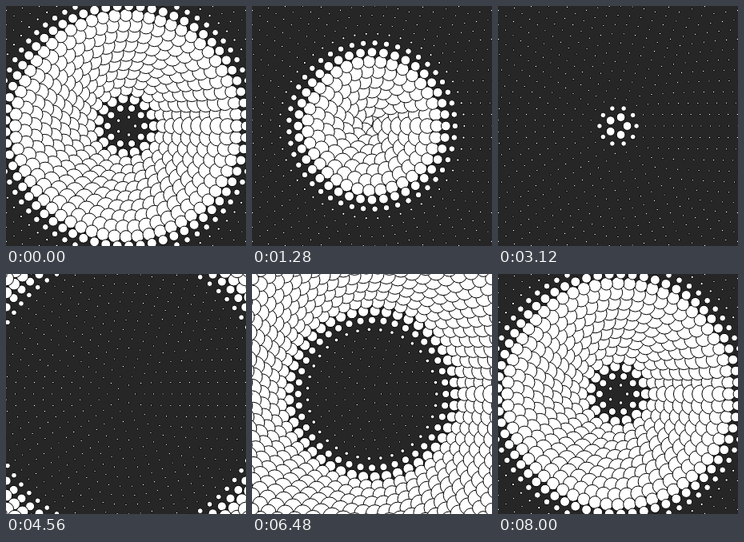
An HTML page with a canvas for the animation above (8.08 s loop, 300x300 px).

```html
<!DOCTYPE html>
<html lang="en">
<head>
<meta charset="utf-8">
<title>Breathing rings</title>
<style>
  html, body { margin: 0; width: 100%; height: 100%; overflow: hidden; background: #262626; }
  canvas { display: block; width: 300px; height: 300px; }
</style>
</head>
<body>
<canvas id="stage" width="300" height="300"></canvas>
<script>
const ctx = document.getElementById("stage").getContext("2d");
const SIZE = 300;
const UNIT = SIZE / 26;      // distance between rings
const RINGS = 20;
const DISKS_PER_RING = 5;    // ring k holds 5k disks
const MIN_RADIUS = 0.1;
const STEP_MS = 80;
const STEPS = 101;           // the last step repeats the first pose

function disk(x, y, radius) {
  ctx.beginPath();
  ctx.arc(x, y, radius, 0, 2 * Math.PI);
  ctx.fill();
  ctx.stroke();
}

function draw(phase) {
  ctx.fillStyle = "#262626";
  ctx.fillRect(0, 0, SIZE, SIZE);
  ctx.fillStyle = "#fff";
  ctx.strokeStyle = "#000";
  ctx.lineWidth = 1;

  // Later disks cover earlier ones: outwards, then counterclockwise.
  for (let ring = 1; ring <= RINGS; ring++) {
    const radius = UNIT * Math.max(MIN_RADIUS, Math.sin(ring / 5 + phase));
    const count = DISKS_PER_RING * ring;
    for (let i = 1; i <= count; i++) {
      const angle = 2 * Math.PI * i / count;
      disk(
        SIZE / 2 + UNIT * ring * Math.cos(angle),
        SIZE / 2 - UNIT * ring * Math.sin(angle),
        radius
      );
    }
  }
}

const start = performance.now();
let shown = -1;

function tick() {
  const step = Math.floor((performance.now() - start) / STEP_MS) % STEPS;
  if (step !== shown) {
    draw(2 * Math.PI * step / (STEPS - 1));
    shown = step;
  }
  requestAnimationFrame(tick);
}
tick();
</script>
</body>
</html>
```
